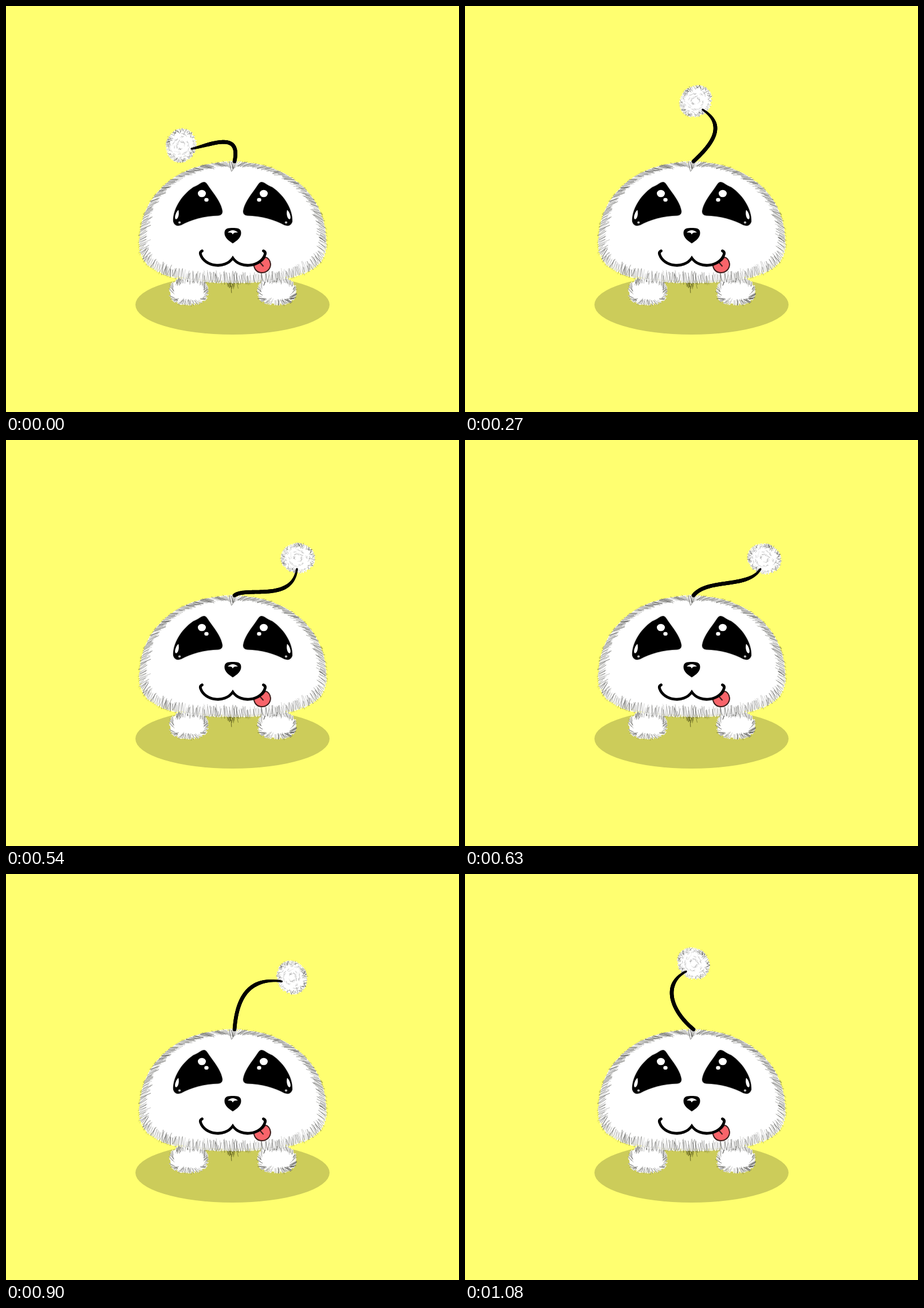
An HTML page with a canvas that plays this animation: 791 px wide and 708 px high, repeating every 1170 ms.

```html
<!DOCTYPE html>
<html lang="en">
<head>
<meta charset="utf-8">
<title>Fluffy creature</title>
<style>
  html, body { margin: 0; width: 100%; height: 100%; overflow: hidden; background: #ffff70; }
  canvas { position: absolute; left: 0; top: 0; }
</style>
</head>
<body>
<canvas id="body" width="791" height="708"></canvas>
<canvas id="antenna" width="791" height="708"></canvas>
<script>
const STEP = 90, STEPS = 13;
const MID = 396;
const BASE = [399, 271];

// Turning points of the swing: step, then two Bezier controls and the tip.
const KEYS = [
  [0,  411,216, 355,243, 324,249],
  [2,  426,238, 438,195, 368,190],
  [4,  425,250, 475,236, 462,184],
  [6,  420,255, 500,284, 508,225],
  [9,  425,210, 462,188, 510,207],
  [11, 374,238, 372,181, 439,167],
  [12, 358,237, 345,191, 386,170]
];

let seed = 1;
const rand = () => (seed = seed * 16807 % 2147483647) / 2147483647;
const spread = (a, b) => a + (b - a) * rand();
const clamp = (v, a, b) => Math.max(a, Math.min(b, v));

// Smooth swing through the keys, wrapping round the loop
function poseAt(step) {
  const m = KEYS.length;
  const key = i => KEYS[(i + m) % m].map((v, j) => j ? v : v + STEPS * Math.floor(i / m));
  const i = KEYS.findLastIndex(k => k[0] <= step);
  const [a, b, c, d] = [key(i - 1), key(i), key(i + 1), key(i + 2)];
  const span = c[0] - b[0], t = (step - b[0]) / span, u = 1 - t;
  return b.map((v, j) => {
    const from = span * (c[j] - a[j]) / (c[0] - a[0]);
    const to = span * (d[j] - b[j]) / (d[0] - b[0]);
    return v * u * u * (1 + 2 * t) + c[j] * t * t * (3 - 2 * t) + t * u * (from * u - to * t);
  }).slice(1);
}

// Clockwise superellipse whose upper and lower halves may differ
function oval(x, y, rx, up, down, nUp = 2, nDown = nUp, count = 180) {
  return Array.from({ length: count }, (_, i) => {
    const a = i / count * 2 * Math.PI, c = Math.cos(a), s = Math.sin(a);
    const n = s < 0 ? nUp : nDown, ry = s < 0 ? up : down;
    const power = v => Math.sign(v) * Math.abs(v) ** (2 / n);
    return [x + rx * power(c), y + ry * power(s)];
  });
}

function fillShape(g, pts, color) {
  g.fillStyle = color;
  g.beginPath();
  pts.forEach(p => g.lineTo(...p));
  g.fill();
}

function strand(g, x, y, angle, back, front, bend, color, width) {
  const c = Math.cos(angle), s = Math.sin(angle);
  g.strokeStyle = color;
  g.lineWidth = width;
  g.beginPath();
  g.moveTo(x - c * back, y - s * back);
  g.quadraticCurveTo(x - s * bend, y + c * bend, x + c * front, y + s * front);
  g.stroke();
}

// Combs hairs along a clockwise outline; sweep leans them along it.
function fur(g, outline, gap, len, sweep, dark) {
  const edge = [];
  outline.forEach((p, i) => {
    const q = outline[(i + 1) % outline.length];
    const dx = q[0] - p[0], dy = q[1] - p[1], d = Math.hypot(dx, dy);
    for (let k = rand() * gap; k < d; k += gap)
      edge.push([p[0] + dx * k / d, p[1] + dy * k / d, dx / d, dy / d]);
  });
  for (const white of [true, false]) {
    for (const [x, y, tx, ty] of edge) {
      const lean = sweep(x, y) + spread(-0.25, 0.25);
      const angle = Math.atan2(-tx + ty * lean, ty + tx * lean);
      const size = len * spread(0.7, 1.1), bend = spread(-1.5, 1.5);
      if (white) strand(g, x, y, angle, size * 0.5, size * 0.2, bend, "#fff", 1.8);
      else strand(g, x, y, angle, size * spread(0.4, 0.95), size * spread(0.1, 0.4), bend,
        `rgba(20,20,15,${spread(0.15, dark)})`, spread(0.5, 0.9));
    }
  }
}

function blob(g, x, y, rx, ry, color) {
  g.fillStyle = color;
  g.beginPath();
  g.ellipse(x, y, rx, ry, 0, 0, 7);
  g.fill();
}

function drawBothSides(g, draw) {
  draw(g);
  g.save();
  g.translate(2 * MID, 0);
  g.scale(-1, 1);
  draw(g);
  g.restore();
}

function foot(g) {
  const outline = oval(319, 498, 32, 22, 21, 2.6);
  fillShape(g, outline, "#fff");
  fur(g, outline, 2, 11, x => clamp((319 - x) / 30, -0.9, 0.9), 0.8);
}

function eye(g) {
  g.shadowColor = "rgba(0,0,0,.3)";
  g.shadowBlur = 3;
  g.fillStyle = "#000";
  g.fill(new Path2D("M346 307C350 307 352 312 357 319C368 334 376 345 378 358Q378 365 371 365.5C346 366 322 373 306 382Q295 386 292 376C291 356 305 331 327 316C337 312 341 307 346 307Z"));
  g.shadowBlur = 0;
  blob(g, 342, 327, 7, 6.3, "#fff");
  blob(g, 350, 338, 3.7, 3.2, "#fff");
  g.fill(new Path2D("M301 355.5C303 362 301 371 297 372C293 371 296 360 301 355.5Z"));
  blob(g, 303, 377.5, 2.2, 2, "#bbb");
}

function drawBody(g) {
  g.lineCap = "round";
  blob(g, 395.5, 521, 169.5, 52, "#cccc5a");
  drawBothSides(g, foot);
  for (let i = 0; i < 14; i++)
    strand(g, spread(386, 406), 485, Math.PI / 2 + spread(-0.4, 0.4), 2, spread(3, 9), 1, "rgba(60,60,10,.6)", 0.8);
  strand(g, 394, 491, 1.6, 3, 9, 1, "#77772f", 1.2);

  const outline = oval(MID, 413, 160, 139, 66, 2.15, 2.55);
  fillShape(g, outline, "#fff");
  const comb = (x, y) => clamp((x - MID) / 25, -1, 1) * clamp((478 - y) / 105, 0, 1.9);
  fur(g, outline, 1.7, 18, comb, 0.7);

  drawBothSides(g, eye);

  g.fillStyle = "#000";
  g.fill(new Path2D("M396 414C388 409 381 403 381.5 395C382 387 389 387 396 387C403 387 410 387 410.5 395C411 403 404 409 396 414Z"));
  g.fillStyle = "#fff";
  g.fill(new Path2D("M387 395Q396 387 405 395Q400 394.5 397.5 396L396 398.5L394.5 396Q392 394.5 387 395Z"));

  const tongue = new Path2D("M432.5 451C434 461 440 465 447 465C456 465 462 458 462 450C461 443 457 439 453 438Q446 449 432.5 451Z");
  g.fillStyle = "#f8646a";
  g.fill(tongue);
  g.strokeStyle = "#3d1e1c";
  g.lineWidth = 2;
  g.stroke(tongue);
  g.stroke(new Path2D("M442 445.5L449 453.5"));

  g.strokeStyle = "#000";
  g.lineWidth = 4.8;
  g.stroke(new Path2D("M342.5 427Q338 429 340 434C347 454 382 460 396 439.5C410 460 445 454 452 434Q454 429 449.5 427"));
}

function drawPompom(g, x, y, angle) {
  seed = 77;
  g.save();
  g.translate(x, y);
  g.rotate(angle);
  const ring = oval(0, 0, 24.5, 28, 28);
  fillShape(g, ring, "#fff");
  fur(g, ring, 1.7, 8, () => spread(-1, 1), 0.6);
  for (let i = 0; i < 80; i++) {
    const a = spread(0, 6.28), r = 7 * (1 + i % 3) + spread(-2, 2);
    strand(g, r * Math.cos(a), r * Math.sin(a), a + 1.57 + spread(-0.6, 0.6),
      2, 2, 1, `rgba(60,60,60,${spread(0.1, 0.5)})`, 0.6);
  }
  g.restore();
}

function drawAntenna(g, step) {
  const [ax, ay, bx, by, x, y] = poseAt(step);
  g.clearRect(0, 0, 791, 708);
  g.lineCap = "round";

  // The pompom sits beyond the tip, lifted a little.
  const reach = Math.hypot(x - bx, y - by);
  const angle = Math.atan2((y - by) / reach - 0.5, (x - bx) / reach);
  drawPompom(g, x + 19 * Math.cos(angle), y + 19 * Math.sin(angle), angle);

  const at = (t, p, a, b, q) =>
    (1 - t) ** 3 * p + 3 * t * (1 - t) ** 2 * a + 3 * t * t * (1 - t) * b + t ** 3 * q;
  g.strokeStyle = "#000";
  for (let i = 0; i < 60; i++) {
    g.lineWidth = 3.2 + 3.4 * Math.min(1, (60 - i) / 18);
    g.beginPath();
    for (const t of [i / 60, (i + 1) / 60])
      g.lineTo(at(t, BASE[0], ax, bx, x), at(t, BASE[1], ay, by, y));
    g.stroke();
  }
}

const context = id => document.getElementById(id).getContext("2d");
const overlay = context("antenna");
drawBody(context("body"));

const start = performance.now();
let shown = -1;
function tick() {
  const step = Math.floor((performance.now() - start) / STEP) % STEPS;
  if (step !== shown) drawAntenna(overlay, shown = step);
  requestAnimationFrame(tick);
}
tick();
</script>
</body>
</html>
```
